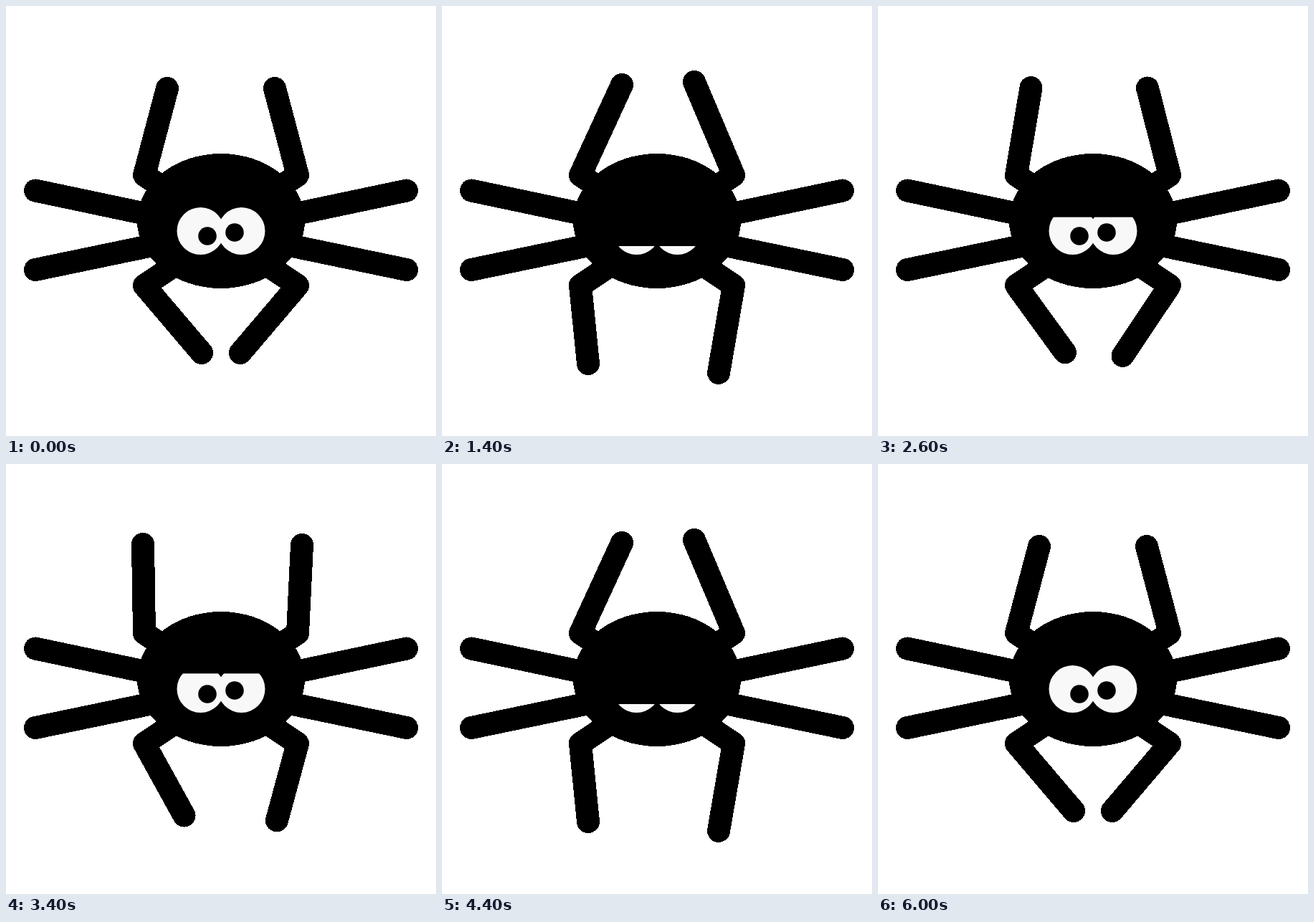
Write an HTML page that moves like this. It is 600 px wide and 600 px high and loops after 6200 ms.

```html
<!DOCTYPE html>
<html lang="en">
<head>
<meta charset="utf-8">
<title>Sleepy spider</title>
<style>
  html, body { margin: 0; width: 100%; height: 100%; overflow: hidden; background: #fff; }
  svg { display: block; width: 100vw; height: 100vh; }
  .legs { fill: none; stroke: #000; stroke-width: 32; stroke-linecap: round; stroke-linejoin: round; }
  .legs, .body { shape-rendering: crispEdges; }
</style>
</head>
<body>
<svg viewBox="0 0 600 600">
  <g class="legs">
    <path d="M41 257.5L200 291M559 257.5L400 291M41 368L200 335M559 368L400 335"/>
  </g>
  <ellipse class="body" cx="300" cy="300" rx="117" ry="94"/>
  <g fill="#f8f8f8">
    <circle cx="271.5" cy="314" r="33"/>
    <circle cx="328.5" cy="314" r="33"/>
  </g>
  <circle cx="281" cy="321" r="12.8"/>
  <circle cx="319" cy="316" r="12.8"/>
  <rect id="lid" x="236" y="260" width="128" height="17"/>
</svg>
<script>
const STEP = 200;    // ms per pose
const LOOP = 6200;   // ms
const CYCLE = 15;    // poses per blink
const PEAK = 8;      // pose with the eyes most closed

// Each tip goes rest, out, in, back, rest; lift is the stretch at the peak.
const legs = [
  { joint: "193 236L235 264", rest: [225, 115], out: [191, 112], in: [251, 110], back: [202, 113], pace: 2, lift: 28 },
  { joint: "407 236L365 264", rest: [375, 115], out: [413, 113], in: [352, 106], back: [377, 114], pace: 2, lift: 28 },
  { joint: "193 390L235 362", rest: [273, 484], out: [224, 497], in: [204, 499], back: [249, 483], pace: 1, lift: 0 },
  { joint: "407 390L365 362", rest: [327, 484], out: [388, 500], in: [386, 512], back: [356, 492], pace: 1.67, lift: 0 }
];
const group = document.querySelector(".legs");
const lid = document.getElementById("lid");

for (const leg of legs) {
  leg.path = document.createElementNS("http://www.w3.org/2000/svg", "path");
  group.append(leg.path);
}

const mix = (a, b, p) => a.map((v, i) => v + (b[i] - v) * p);

function tipAt(leg, pose) {
  if (pose < 4) return mix(leg.rest, leg.out, Math.min(1, leg.pace * pose / 4));
  if (pose < 7) return mix(leg.out, leg.in, (pose - 4) / 3);
  if (pose < 9) {
    const [x, y] = leg.in;
    return [x, y - leg.lift * (1 - Math.abs(pose - PEAK))];
  }
  if (pose < 11) return mix(leg.in, leg.back, (pose - 9) / 2);
  return mix(leg.back, leg.rest, (pose - 11) / 4);
}

function lidAt(pose) {
  const p = pose < PEAK ? pose / PEAK : (CYCLE - pose) / (CYCLE - PEAK);
  return 278 + 66 * p ** 1.1;
}

function draw(time) {
  const pose = Math.floor((time % LOOP) / STEP) % CYCLE;
  for (const leg of legs) {
    leg.path.setAttribute("d", `M${tipAt(leg, pose).join(" ")}L${leg.joint}`);
  }
  lid.setAttribute("height", lidAt(pose) - 260);
}

const start = performance.now();
function tick() {
  draw(performance.now() - start);
  requestAnimationFrame(tick);
}
tick();
</script>
</body>
</html>
```
